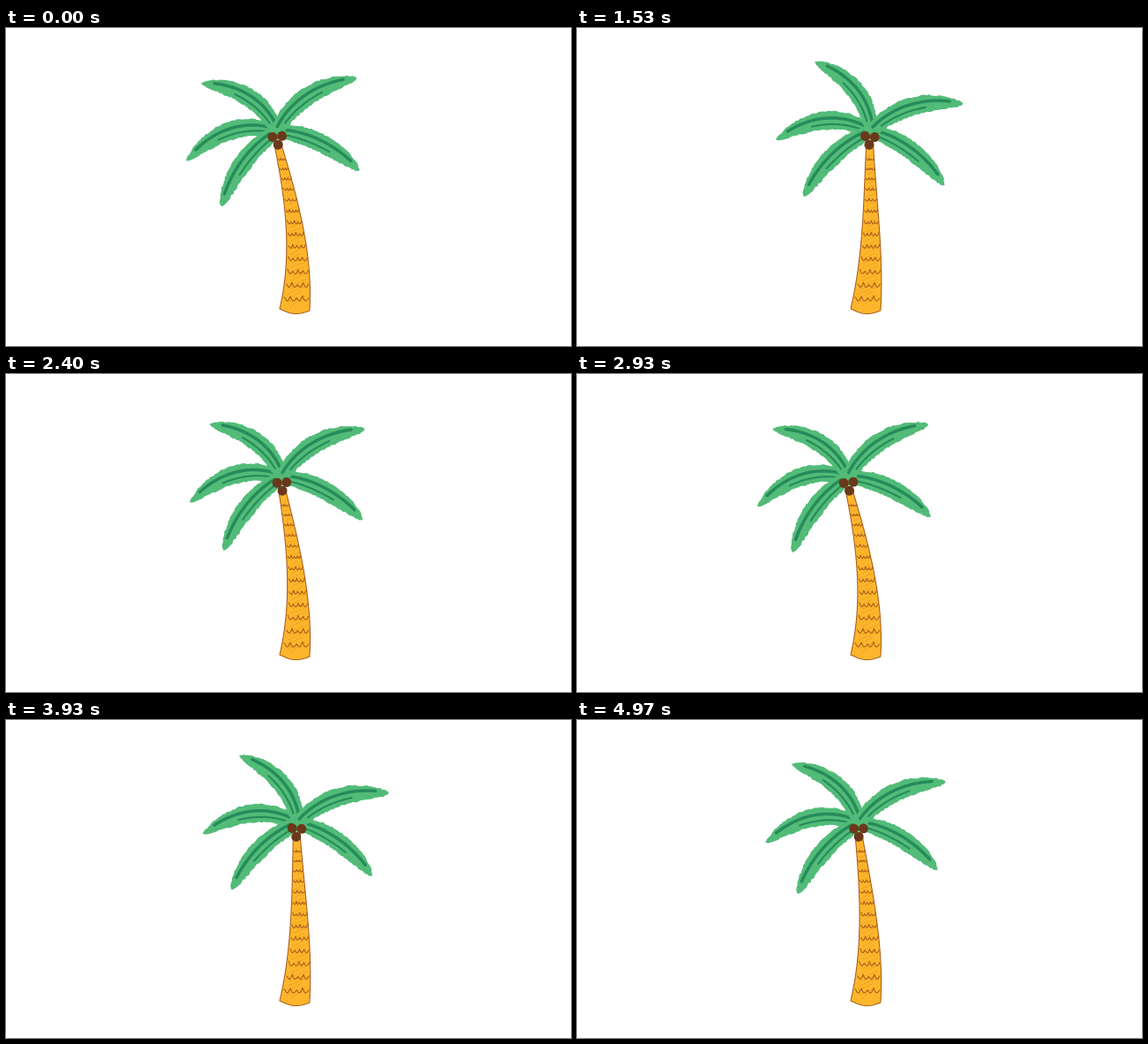
Recreate the animation shown at these times as an HTML page. Size 640 by 360 pixels, loop 5000 ms.

```html
<!DOCTYPE html>
<html lang="en">
<head>
<meta charset="utf-8">
<title>Swaying palm</title>
<style>
  html, body { margin: 0; width: 100%; height: 100%; overflow: hidden; background: #fff; }
  svg { display: block; width: 100%; height: 100%; }
  path { stroke-linecap: round; stroke-linejoin: round; fill: none; }
  .leaf { fill: #52bb78; stroke: #52bb78; stroke-width: 1.2; }
  .rib { stroke: #268b5a; stroke-width: 3.5; }
  .vein { stroke: #268b5a; stroke-width: 2.1; }
  .trunk { fill: #fdb62b; stroke: #a9601f; stroke-width: 1.1; }
  .grain { stroke: #eea024; stroke-width: .8; }
  .bark { stroke: #a95d1b; stroke-width: 1.1; }
  .nut { fill: #6a391b; }
</style>
</head>
<body>
<svg viewBox="0 0 640 360"></svg>
<script>
const LOOP = 5000, PERIOD = 2826;
const SWAY = 12.6;                  // sideways travel of the crown
const REST = 0.052;                 // sway value of the pose the shapes describe
const PIVOT = [320.4, 122];
const HUB = [321, 117];             // where the fronds meet
const GROUND = 318, HEIGHT = 186;

const svg = document.querySelector('svg');
const range = (n, f) => Array.from({ length: n + 1 }, (_, i) => f(i / n, i));
const line = pts => 'M' + pts.map(p => p.map(n => n.toFixed(2)).join(' ')).join('L');

let seed = 7;
const random = () => (seed = seed * 16807 % 2147483647) / 2147483647;
const rough = p => p.map(n => n + (random() - .5) * 1.4);

function add(parent, tag, attrs) {
  const el = document.createElementNS(svg.namespaceURI, tag);
  for (const name in attrs) el.setAttribute(name, attrs[name]);
  return parent.appendChild(el);
}

// Trunk: centre line and half width as polynomials of the height k (0 ground, 1 crown)
function trunkAt(y, side) {
  const k = (GROUND - y) / HEIGHT;
  const centre = 327 + 27.1 * k - 51 * k ** 2 + 17.5 * k ** 3;
  const half = 17 - 16.7 * k + 3.7 * k ** 2;
  return [centre + side * half, y];
}

const outline = [
  ...range(30, t => trunkAt(128 + (GROUND - 128) * t, -1)),
  ...range(12, t => [310.3 + 33.5 * t, GROUND + 2 * t + 4.5 * Math.sin(Math.PI * t)]),
  ...range(30, t => trunkAt(GROUND + 1 - (GROUND - 127) * t, 1))
];

// rows of scallops with pointed peaks, tighter towards the top
const bark = [];
for (let y = 309, gap = 15.6; y > 140; y -= gap, gap -= .42) {
  const n = y > 200 ? 4 : 3;
  const depth = 1.8 + (y - 140) / 48;
  const shift = random() * 6;
  bark.push(range(n * 8, (t, i) => {
    const peak = 1 - Math.abs(Math.sin(Math.PI * i / 8));
    const x = trunkAt(y, -.8 + 1.7 * t)[0];
    return [x, y - depth * peak * (.85 + .25 * Math.sin(i / 3 + shift))];
  }));
}

const grain = range(34, t => {
  const y = 146 + 170 * t;
  const from = random() * .5 - .75, to = .2 + random() * .6;
  return [trunkAt(y, from), [trunkAt(y, to)[0], y - 2 - 6 * t]];
});

const trunk = {
  trunk: add(svg, 'path', { class: 'trunk' }),
  grain: add(svg, 'path', { class: 'grain' }),
  bark: add(svg, 'path', { class: 'bark' })
};

const turning = [];

// A leaf bowed upwards from its chord; low leaves turn less in the wind
function frond(angle, length, bow) {
  const a = angle * Math.PI / 180, cos = Math.cos(a), sin = Math.sin(a);
  const up = cos > 0 ? -1 : 1;
  const point = (t, across) => {
    const s = t ** .92;
    const half = 12.7 * (1 - t) ** .6 * (.6 + 1.1 * t);
    const x = length * t;
    const y = up * (bow * 4 * s * (1 - s) + half * across);
    return [HUB[0] + x * cos - y * sin, HUB[1] + x * sin + y * cos];
  };
  const stroke = (from, to, across) => line(range(16, t => point(from + (to - from) * t, across)));
  const edge = [...range(45, t => point(t, 1)), ...range(45, t => point(1 - t, -1))];
  const el = add(svg, 'g');
  add(el, 'path', { class: 'leaf', d: line(edge.map(rough)) + 'Z' });
  add(el, 'path', { class: 'rib', d: stroke(.03, .88, .28) });
  add(el, 'path', { class: 'vein', d: stroke(.12, .62, -.45) });
  turning.push({ el, turn: 7.2 - 3.4 * sin });
}

frond(169.2, 107, 16.5);
frond(131.9, 105, 9.4);
frond(30.9, 102, 9);
frond(-137.4, 101, 15);
frond(-24.8, 108, 13.5);

const nuts = add(svg, 'g');
for (const a of [90, 210, 330].map(d => d * Math.PI / 180)) {
  add(nuts, 'circle', { class: 'nut', cx: 320.4 + 6.2 * Math.cos(a), cy: 126 + 6.2 * Math.sin(a), r: 5.5 });
}
turning.push({ el: nuts, turn: 6 });

function draw(time) {
  const sway = -Math.cos(2 * Math.PI * time / PERIOD) - REST;
  const bend = ([x, y]) => {
    const h = Math.max(0, GROUND - y) / 190;
    return [x + SWAY * sway * h * h, y];
  };
  const rows = list => list.map(row => line(row.map(bend))).join('');
  trunk.trunk.setAttribute('d', rows([outline]) + 'Z');
  trunk.grain.setAttribute('d', rows(grain));
  trunk.bark.setAttribute('d', rows(bark));
  for (const { el, turn } of turning) {
    el.setAttribute('transform', `translate(${SWAY * sway} 0) rotate(${turn * sway} ${PIVOT})`);
  }
}

const start = performance.now();
function tick() {
  draw((performance.now() - start) % LOOP);
  requestAnimationFrame(tick);
}
tick();
</script>
</body>
</html>
```
